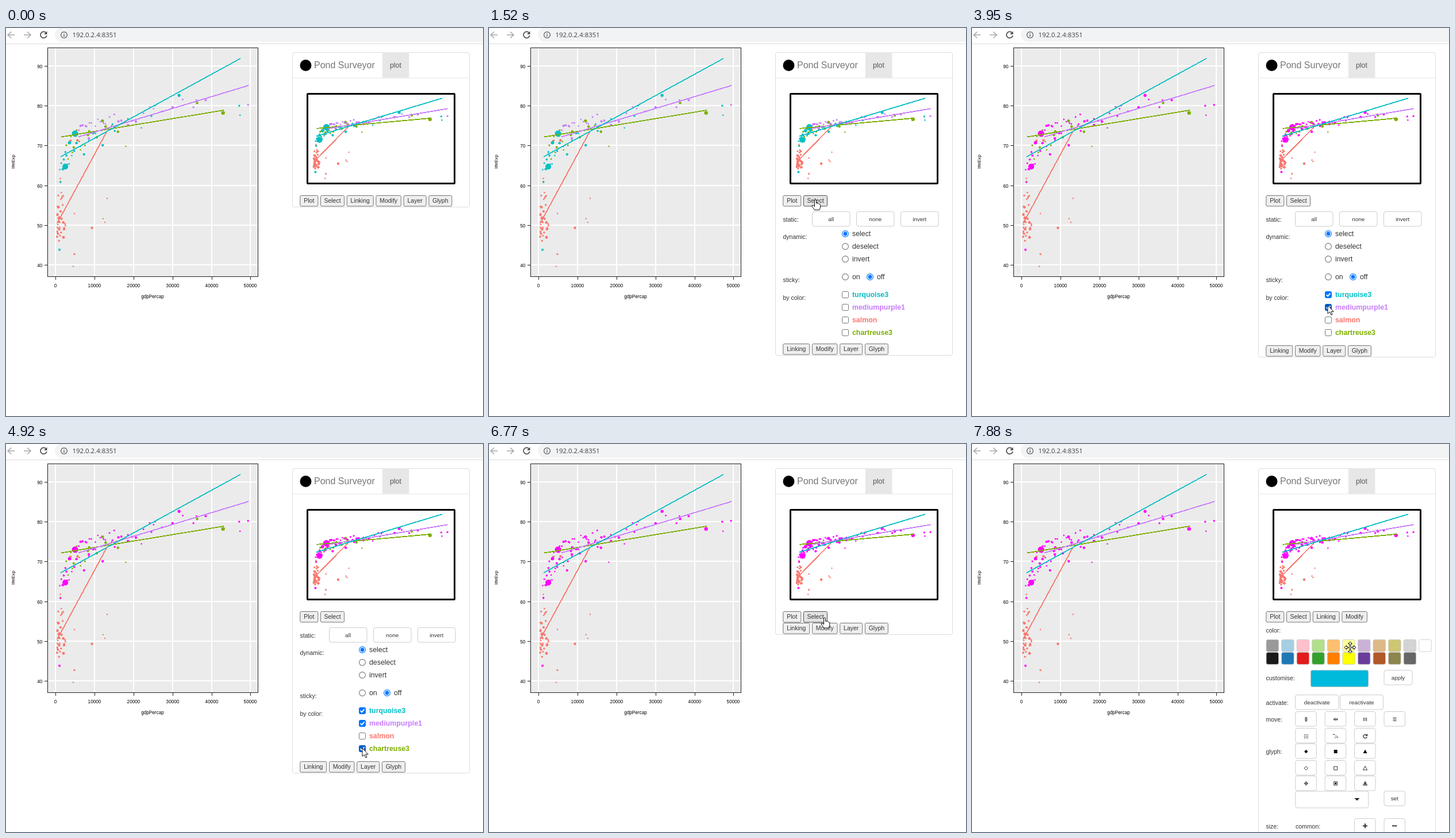
An HTML page that plays this animation: 830x675 px, repeating every 8000 ms.

```html
<!DOCTYPE html>
<html lang="en">
<head>
<meta charset="utf-8">
<title>Plot inspector</title>
<style>
html, body { margin: 0; width: 100%; height: 100%; overflow: hidden; background: #fff; }
svg { display: block; width: 830px; height: 675px; font-family: "Liberation Sans", Arial, sans-serif; }
</style>
</head>
<body>
<svg id="stage" viewBox="0 0 830 675"></svg>
<script>
const LOOP = 8000;
const SELECTED = '#ff00ff';

// Each cloud follows a trend of life expectancy over GDP (in hundreds), plus a few landmarks [gdp, life, radius].
const regions = [
  { id: 'salmon', color: '#f8766d', line: [89, 340, 176, 179], selectAt: Infinity,
    count: 40, gdp: [3.5, 26], spread: 11, trend: () => 51.5,
    landmarks: [[45, 39.6, 1.2], [48, 42.7, 1.6], [48, 52.9, 1.2], [93, 49.3, 2.2], [20, 46.9, 2.4],
      [121.5, 51.6, 1.2], [126, 50.7, 1.2], [132, 56.7, 1.2], [56, 71.3, 2.2], [38, 71.2, 2]] },
  { id: 'chartreuse3', color: '#7cae00', line: [96, 189.5, 379, 143], selectAt: 5040,
    count: 20, gdp: [27, 180], spread: 4, trend: g => 66.5 + 3.4 * Math.log(g / 12),
    landmarks: [[429.5, 78.2, 3.2], [363, 80.7, 2.2], [120, 76.2, 2.6], [180, 69.8, 1.2], [12, 60.9, 1.6]] },
  { id: 'mediumpurple1', color: '#c77cff', line: [126, 189.5, 422, 100], selectAt: 3410,
    count: 28, gdp: [59, 407], spread: 2, trend: g => 73 + 0.0214 * g,
    landmarks: [[493.6, 80.2, 1.7], [85, 71.8, 2.2]] },
  { id: 'turquoise3', color: '#00bfc4', line: [95, 224, 408, 53], selectAt: 3830,
    count: 25, gdp: [10, 290], spread: 4, trend: g => 62 + 4.6 * Math.log(g / 9.4),
    landmarks: [[49.6, 73, 5.5], [24.5, 64.7, 5.1], [35.4, 70.7, 2.9], [316.6, 82.6, 2.6],
      [9.7, 43.8, 2], [471, 80, 1.7], [473, 77.6, 1.3]] }
];

function seeded(seed) {
  return () => (seed = (seed * 16807) % 2147483647) / 2147483647;
}

function cloud({ count, gdp: [low, high], spread, trend, landmarks }, seed) {
  const rnd = seeded(seed);
  const points = range(count).map(i => {
    const g = low * (high / low) ** ((i + rnd()) / count);
    return [g, trend(g) + spread * (rnd() + rnd() - 1), 1.3 + rnd() ** 2];
  });
  return points.concat(landmarks);
}

const range = n => [...Array(n).keys()];
const plotX = gdp => 86.5 + gdp * 0.678;
const plotY = life => 66 + (90 - life) * 6.92;
const main = { x: v => v, y: v => v };
const mini = { x: v => 473.3 + v * 0.7, y: v => 101.7 + v * 0.386 };

const text = (x, y, s, size = 10.5, more = 'fill="#333"') => `<text x="${x}" y="${y}" font-size="${size}" ${more}>${s}</text>`;
const mid = (x, y, s, size = 9.9) => text(x, y, s, size, 'fill="#333" text-anchor="middle"');
const rect = (x, y, w, h, fill, more = '') => `<rect x="${x}" y="${y}" width="${w}" height="${h}" fill="${fill}" ${more}/>`;
const path = (d, more = 'fill="none" stroke="#333"') => `<path d="${d}" ${more}/>`;
const circle = (x, y, r, more = '') => `<circle cx="${x}" cy="${y}" r="${r}" ${more}/>`;

function series(view) {
  const dots = regions.map((r, i) => `<g class="dots-${r.id}" fill="${r.color}">` +
    cloud(r, 4177 * (i + 1)).map(([g, life, size]) => circle(view.x(plotX(g)), view.y(plotY(life)), size)).join('') + '</g>');
  const fits = regions.map(({ line: [x1, y1, x2, y2], color }) =>
    path(`M${view.x(x1)} ${view.y(y1)}L${view.x(x2)} ${view.y(y2)}`,
      `stroke="${color}" stroke-width="1.8" shape-rendering="crispEdges"`));
  return dots.concat(fits).join('');
}

function browserBar() {
  const arrow = (x, dir) => path(`M${x - 6 * dir} 12H${x + 6 * dir}M${x} 6.5L${x + 6 * dir} 12L${x} 17.5`,
    'fill="none" stroke="#a5a7aa" stroke-width="1.5"');
  return rect(85, -1, 760, 25, '#f1f3f4', 'rx="12.5"') + rect(0, 27, 830, 1, '#dcdcdc') +
    arrow(9, -1) + arrow(37, 1) +
    path('M69.6 8.2A5.5 5.5 0 1 0 70.9 13', 'fill="none" stroke="#4c4f53" stroke-width="1.7"') +
    path('M71.5 5.5V11H66Z', 'fill="#4c4f53"') +
    circle(101, 12, 5.4, 'fill="none" stroke="#5f6368" stroke-width="1.3"') +
    rect(100.3, 11, 1.4, 4, '#5f6368') + rect(100.3, 8.5, 1.4, 1.4, '#5f6368') +
    text(115.5, 16, '192.0.2.4:8351', 11.4, 'fill="#3c4043" font-family="Open Sans, sans-serif"');
}

function chart() {
  let grid = '', axes = '';
  for (const i of range(6)) {
    const x = Math.round(86.4 + i * 67.8), y = Math.round(66 + i * 69.2);
    grid += `M${x} 35V432M73 ${y}H438`;
    axes += path(`M${x + .5} 433V438M67 ${y + .5}H73`, 'stroke="#222"') +
      text(x, 450.5, i * 10000, 8.2, 'fill="#000" text-anchor="middle"') +
      text(63.3, y + 3.8, 90 - i * 10, 8.2, 'fill="#000" text-anchor="end"');
  }
  return rect(73, 35, 365, 397, '#ebebeb') + path(grid, 'stroke="#fff" stroke-width="2"') +
    series(main) + rect(72.5, 34.5, 366, 398, 'none', 'stroke="#222"') + axes +
    text(255, 470, 'gdpPercap', 8.2, 'fill="#000" text-anchor="middle"') +
    text(0, 0, 'lifeExp', 8.1, 'fill="#000" text-anchor="middle" transform="translate(15 232.5) rotate(-90)"');
}

const whiteButton = (x, y, w, label = '') =>
  rect(x + .5, y + .5, w, 25.5, '#fff', 'rx="3.5" stroke="#ccc"') + (label && mid(x + w / 2 + .5, y + 16.7, label));

function radio(x, y, label, on) {
  const c = on ? '#0075ff' : '#767676';
  return circle(x, y, 5.4, `fill="#fff" stroke="${c}" stroke-width="1.1"`) +
    (on ? circle(x, y, 3.4, `fill="${c}"`) : '') + text(x + 12, y + 4.2, label, 12.35);
}

function checkbox(id, y) {
  const color = regions.find(r => r.id === id).color;
  return `<g id="box-${id}">${rect(614.5, y - 5.5, 11, 11, '#fff', 'rx="2" stroke="#767676"')}` +
    path(`M616.8 ${y}l2.3 2.5 4.4-5.2`, 'fill="none" stroke="#fff" stroke-width="1.9"') + '</g>' +
    text(632, y + 4, id, 12.35, `fill="${color}" font-weight="bold"`);
}

function selectPanel() {
  return text(511.5, 337, 'static:') +
    ['all', 'none', 'invert'].map((s, i) => whiteButton(562 + 77 * i, 319, 65.5, s)).join('') +
    text(511.5, 366.5, 'dynamic:') +
    ['select', 'deselect', 'invert'].map((s, i) => radio(620, 358 + 22 * i, s, i === 0)).join('') +
    text(511.5, 441.5, 'sticky:') + radio(620, 433, 'on') + radio(663, 433, 'off', true) +
    text(511.5, 472.5, 'by color:') +
    ['turquoise3', 'mediumpurple1', 'salmon', 'chartreuse3'].map((id, i) => checkbox(id, 464 + 22 * i)).join('');
}

// Small icons, each drawn around its own origin.
function icons() {
  const line = 'fill="none" stroke="#333"', solid = 'fill="#111"';
  const shapes = ['M0-3.2L3.2 0 0 3.2-3.2 0Z', 'M-3-3H3V3H-3Z', 'M0-3.5L3.6 3H-3.6Z'];
  const inner = ['M0-3V3M-3 0H3', 'M-1.5-1.5H1.5V1.5H-1.5Z', 'M0-3L1.5 2H-1.5Z'];
  const rnd = seeded(99);
  const put = (col, y, s, turn = 0) => `<g transform="translate(${581.3 + 51.4 * col} ${y}) rotate(${turn})">${s}</g>`;
  const stack = path('M0-4V4M-2-2.5H2M-2.5 0H2.5M-2 2.5H2', line);
  const bars = path('M-2.5-3V3M0-3V3M2.5-3V3', line);
  const speck = (x, y) => rect(x, y, 1.4, 1.4, '#333');
  return put(0, 479, stack) + put(1, 479, stack, 90) + put(2, 479, bars) + put(3, 479, bars, 90) +
    put(0, 508.5, range(9).map(i => speck(i % 3 * 2.8 - 3.4, (i / 3 | 0) * 2.8 - 3.4)).join('')) +
    put(1, 508.5, range(6).map(i => speck(i * 1.5 - 4.5, rnd() * 7 - 4)).join('')) +
    put(2, 508.5, path('M2.5-2A3.2 3.2 0 1 0 3.2 1M3.5-4V-1H.5', 'fill="none" stroke="#222" stroke-width="1.2"')) +
    shapes.map((d, i) => put(i, 535, path(d, solid)) + put(i, 564, path(d, line)) +
      put(i, 590.5, path(d, line) + path(inner[i], i ? solid : line))).join('');
}

function modifyPanel() {
  const light = '#999 #a6cee3 #ffc0cb #b2df8a #fdbf6f #ffff99 #cab2d6 #deb887 #cdc673 #d3d3d3 #fff';
  const dark = '#1a1a1a #1f78b4 #e31a1c #33a02c #ff7f00 #ff0 #6a3d9a #b15928 #8b864e #666';
  const swatches = (list, y) => list.split(' ').map((c, i) =>
    rect(512 + i * 26.57, y, 21.6, 21, c, 'rx="3" stroke="#ccc" stroke-width=".9"')).join('');
  const row = (y, n, first = 0) => range(n).map(i => whiteButton(562.3 + (first + i) * 51.4, y, 36.5)).join('');
  return text(511.5, 328, 'color:') + swatches(light, 340.3) + swatches(dark, 362.4) +
    text(511.5, 410.5, 'customise:') + rect(589.3, 393.5, 100.5, 29, '#00badd', 'rx="3" stroke="#ccc"') +
    whiteButton(716.5, 393, 49, 'apply') +
    text(511.5, 453.5, 'activate:') + whiteButton(562, 436, 75.5, 'deactivate') + whiteButton(640, 436, 75, 'reactivate') +
    text(511.5, 483, 'move:') + row(465, 4) + row(494, 3) +
    text(511.5, 538.5, 'glyph:') + row(521, 3) + row(550, 3) + row(577, 3) + icons() +
    rect(562.8, 604, 127, 29, '#fff', 'rx="3.5" stroke="#ccc"') + path('M665.5 616H674.5L670 620.5Z', 'fill="#222"') +
    whiteButton(716.5, 603.5, 36.5, 'set') +
    text(511.5, 668.5, 'size:') + text(563, 668.5, 'common:') + row(651, 2, 2) +
    path('M680 664.3H688M684 660.3V668.3M731 664.3H739.5', 'stroke="#222" stroke-width="1.8"');
}

const tabs = Object.entries({ Plot: 32, Select: 42, Linking: 47, Modify: 44.5, Layer: 40, Glyph: 41 });

function inspector() {
  return rect(498.5, 42.5, 308, 269, '#fff', 'id="frame" rx="3.5" stroke="#ddd"') +
    rect(499, 86.5, 307, 1, '#e7e7e7') + rect(655, 42, 46.5, 45, '#e7e7e7') +
    circle(521.5, 65, 10, 'fill="#000"') +
    text(536, 70, 'Pond Surveyor', 16, 'fill="#777"') + text(668, 69, 'plot', 12.35, 'fill="#555"') +
    series(mini) + rect(524.5, 114.5, 256, 156, 'none', 'stroke="#000" stroke-width="3" rx="1"') +
    '<clipPath id="fold"><rect id="fold-box" x="499" y="311" width="307" height="0"/></clipPath>' +
    `<g clip-path="url(#fold)"><g id="select">${selectPanel()}</g><g id="modify">${modifyPanel()}</g></g>` +
    tabs.map(([name, w], i) => `<g id="tab${i}">${rect(.5, .5, w - 1, 18.5, '#efefef', 'rx="2"')}${mid(w / 2, 13.4, name, 10.5)}</g>`).join('');
}

function cursors() {
  const ink = 'fill="#fff" stroke="#111" stroke-linejoin="round"';
  const arms = range(4).map(i =>
    path('M1.2-3.5V-6.5H3.5L0-10-3.5-6.5H-1.2V-3.5Z', `${ink} transform="rotate(${i * 90})"`)).join('');
  return `<g id="cursor"><g id="arrow">${path('M0 0V14.5L3.4 11.5 5.8 16.8 8 15.8 5.7 10.8H10.2Z', ink)}</g>` +
    `<g id="hand">${path('M-1.5 1Q-1.5-.3 0-.3T1.5 1V6Q3 5 4.2 6.3 6 5.8 6.8 7.4 8.6 7.2 8.6 9.5V13L7 17.6H-1.5L-5.6 11.6Q-6.5 9-4.2 9.3L-1.5 11.5Z', ink)}</g>` +
    `<g id="move">${arms}${circle(0, 0, 1.8, ink)}</g></g>`;
}

document.getElementById('stage').innerHTML = rect(0, 0, 830, 675, '#fff') + browserBar() + chart() + inspector() + cursors();

const $ = id => document.getElementById(id);
const show = (el, on) => el.setAttribute('visibility', on ? 'inherit' : 'hidden');
const clamp = p => Math.min(1, Math.max(0, p));
const ease = p => 1 - (1 - clamp(p)) ** 3;

// The pointer enters at 430 ms and then makes these moves: start, end, x, y.
const enter = { t: 430, x: 771, y: 394 };
const moves = [
  [430, 850, 537, 284], [850, 970, 568, 299], [1700, 2190, 618, 483], [3410, 3560, 619, 461],
  [3830, 4100, 619, 509], [4250, 4400, 620, 529], [5220, 5600, 734, 470], [5600, 6350, 573, 303],
  [6700, 7300, 667, 298], [7600, 7860, 658, 354]
];

function cursorAt(t) {
  let { x, y } = enter;
  for (const [start, end, toX, toY] of moves) {
    const p = clamp((t - start) / (end - start));
    x += (toX - x) * p;
    y += (toY - y) * p;
  }
  return [x, y];
}

// Which accordion section is open, and how tall it is.
function foldAt(t) {
  if (t >= 7540) return { open: 3, height: Math.round(520 * ease((t - 7540) / 350)) };
  if (t >= 1210 && t < 6800)
    return { open: 1, height: Math.round(241 * ease((t - 1210) / 400) * (1 - ease((t - 6450) / 350))) };
  return { open: -1, height: 0 };
}

function drawTabs(fold, cx, cy) {
  let x = 511.3, y = 291, onTab = false;
  tabs.forEach(([, w], i) => {
    const g = $('tab' + i), box = g.firstChild;
    const hover = cx >= x && cx <= x + w && cy >= y && cy <= y + 20;
    onTab = onTab || hover;
    g.setAttribute('transform', `translate(${x} ${y})`);
    box.setAttribute('fill', hover ? '#e3e3e3' : '#efefef');
    box.setAttribute('stroke', hover ? '#4f4f4f' : '#767676');
    x += w + 3.7;
    if (i === fold.open) { x = 511.3; y = 311 + fold.height; }
  });
  return onTab;
}

function drawBox(id, checked, cx, cy) {
  const g = $('box-' + id), box = g.firstChild, top = +box.getAttribute('y');
  const hover = cx >= 614 && cx <= 626 && cy >= top && cy <= top + 12;
  const blue = hover ? '#005cc8' : '#0075ff';
  box.setAttribute('fill', checked ? blue : '#fff');
  box.setAttribute('stroke', checked ? blue : hover ? '#4f4f4f' : '#767676');
  show(g.lastChild, checked);
}

function draw(t) {
  const [cx, cy] = cursorAt(t), fold = foldAt(t);
  for (const r of regions) {
    const fill = t >= r.selectAt ? SELECTED : r.color;
    document.querySelectorAll('.dots-' + r.id).forEach(g => g.setAttribute('fill', fill));
    drawBox(r.id, t >= r.selectAt - 120, cx, cy);
  }
  $('fold-box').setAttribute('height', fold.height);
  $('frame').setAttribute('height', 269 + (fold.open < 0 ? 0 : fold.height + 20));
  show($('select'), fold.open === 1);
  show($('modify'), fold.open === 3);

  const onTab = drawTabs(fold, cx, cy);
  const moving = t >= 7700 && !onTab;
  $('cursor').setAttribute('transform', `translate(${cx} ${cy})`);
  show($('cursor'), t >= enter.t);
  show($('hand'), onTab);
  show($('move'), moving);
  show($('arrow'), !onTab && !moving);
}

// Children inherit visibility, so a hidden cursor group hides whichever pointer is active.
function tick() {
  draw(performance.now() % LOOP);
  requestAnimationFrame(tick);
}
tick();
</script>
</body>
</html>
```
